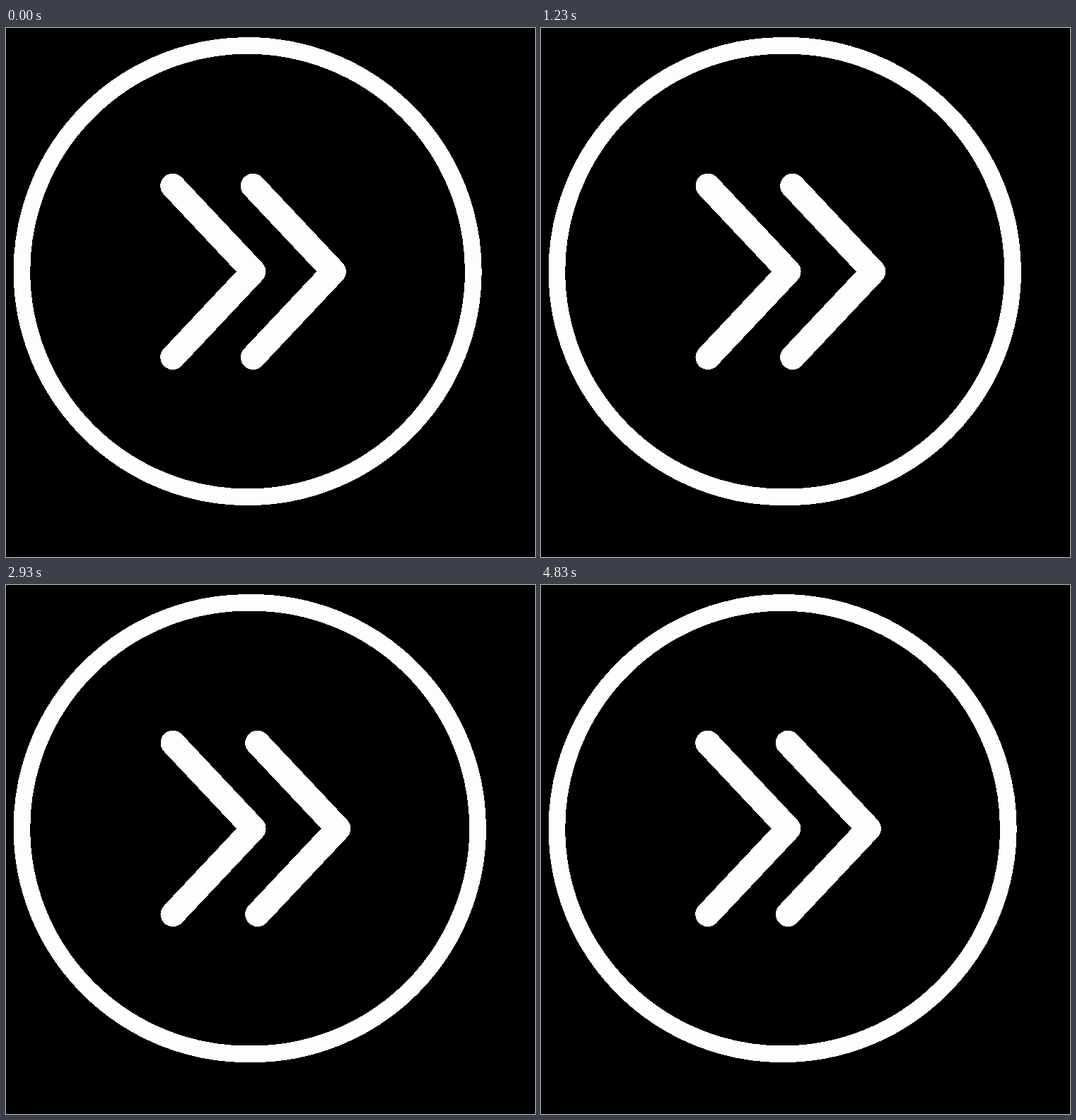
Recreate the animation shown at these times as an HTML page. Size 748x748 px, loop 5.11 s.

```html
<!DOCTYPE html>
<html lang="en">
<head>
<meta charset="utf-8">
<title>Next button</title>
<style>
  html, body { margin: 0; width: 100%; height: 100%; overflow: hidden; background: #000; }
  svg { display: block; width: 100vw; height: 100vh; }
  rect, path {
    fill: none;
    stroke: #fdfdfd;
    stroke-linecap: round;
    stroke-linejoin: round;
    shape-rendering: crispEdges;
  }
  rect { stroke-width: 23.7; }
  path { stroke-width: 35; }
</style>
</head>
<body>
<svg viewBox="0 0 748 748">
  <rect id="ring" x="22.4" y="24.9" width="638.4" height="638.4" rx="319.2"/>
  <path id="left" d="M235.7 223.2L349.8 344.4L235.7 465.6"/>
  <path id="right" d="M349.3 223.2L463.4 344.4L349.3 465.6"/>
</svg>
<script>
  const LOOP = 5110, CYCLE = 1700, SIZE = 638.4, PEAK = 20;
  const [ring, left, right] = ['ring', 'left', 'right'].map(id => document.getElementById(id));

  // cubic-bezier(.306, 0, .49, 1), solved by bisection
  function ease(x) {
    if (x <= 0) return 0;
    if (x >= 1) return 1;
    let lo = 0, hi = 1, s = x;
    for (let i = 0; i < 30; i++) {
      s = (lo + hi) / 2;
      const r = 1 - s;
      if (3 * r * r * s * 0.306 + 3 * r * s * s * 0.49 + s * s * s < x) lo = s;
      else hi = s;
    }
    return s * s * (3 - 2 * s);
  }

  // Out to the peak, then back to rest at `end`
  const swing = (n, reach, end) =>
    reach * (n < PEAK ? ease(n / PEAK) : 1 - ease((n - PEAK) / (end - PEAK)));

  // 30 fps clock that skips every third tick
  const tick = t => Math.floor(t / 100) * 3 + (t % 100 >= 30 ? 1 : 0);

  function draw(time) {
    const n = tick((time % LOOP) % CYCLE);
    ring.setAttribute('width', SIZE + swing(n, 65.5, 43));
    left.setAttribute('transform', `translate(${swing(n, 70.6, 38)} 0)`);
    right.setAttribute('transform', `translate(${swing(n, 66.2, 43)} 0)`);
  }

  const start = performance.now();
  function loop() {
    draw(performance.now() - start);
    requestAnimationFrame(loop);
  }
  loop();
</script>
</body>
</html>
```
